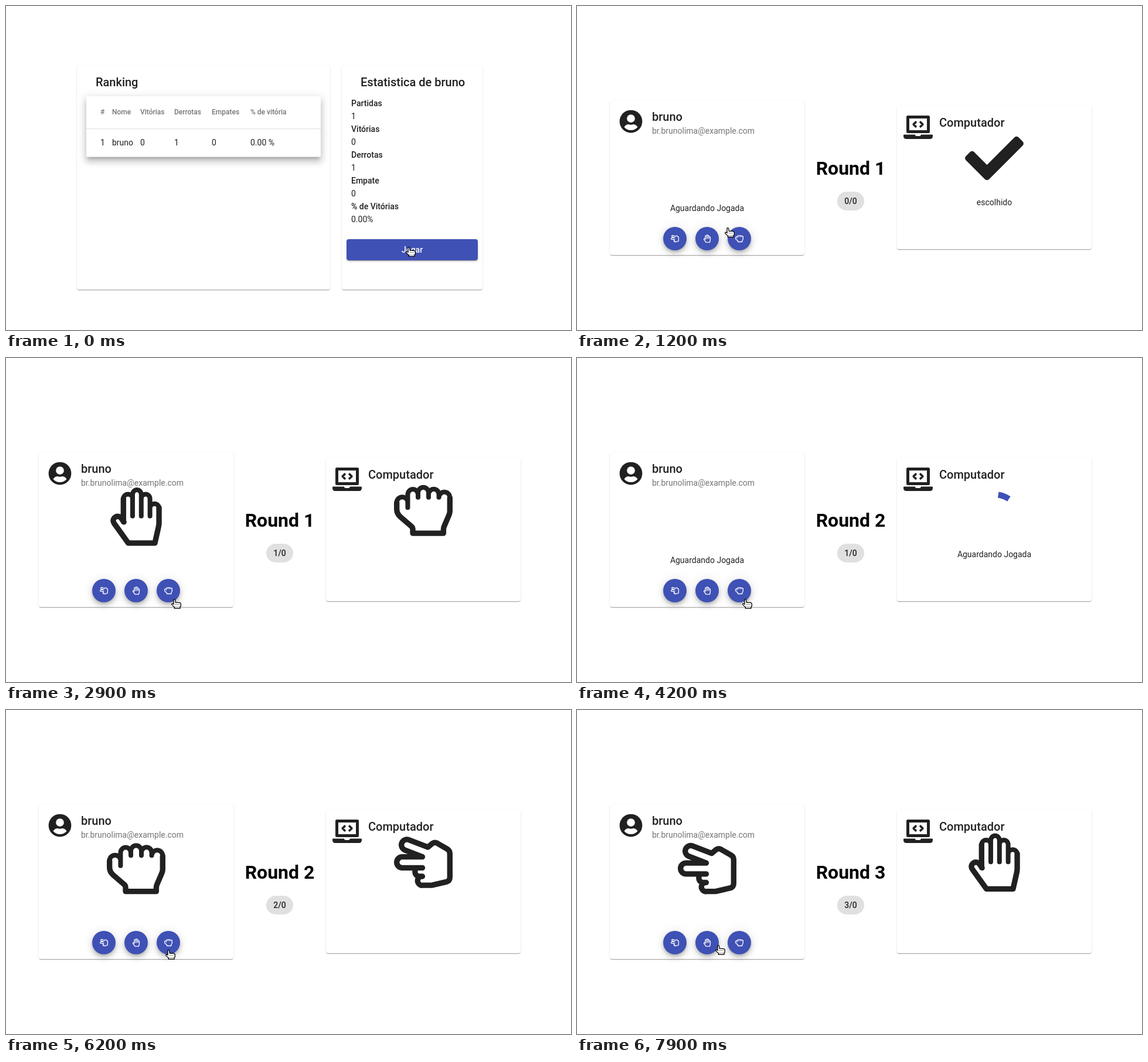
An HTML page that plays this animation: 964 by 553 pixels, repeating every 8000 ms.

```html
<!DOCTYPE html>
<html lang="pt">
<head>
<meta charset="utf-8">
<title>Jogo</title>
<style>
  html, body { margin: 0; width: 100%; height: 100%; overflow: hidden; background: #fff; }
  #stage { position: absolute; left: 0; top: 0; width: 964px; height: 553px; overflow: hidden; }
  #stage > svg, .box { position: absolute; }
  #stage > svg { left: 0; top: 0; }
  .box { left: var(--x); top: var(--y); width: var(--w); height: var(--h); background: #fff; }
  .card {
    border-radius: 4px;
    box-shadow: 0 2px 1px -1px rgba(0,0,0,.2), 0 1px 1px rgba(0,0,0,.14), 0 1px 3px rgba(0,0,0,.12);
  }
  .table, #play.pressed {
    box-shadow: 0 5px 5px -3px rgba(0,0,0,.2), 0 8px 10px 1px rgba(0,0,0,.14), 0 3px 14px 2px rgba(0,0,0,.12);
  }
  .table::before, .table::after {
    content: ""; position: absolute; left: 0; right: 0; height: 1px; background: rgba(0,0,0,.12);
  }
  .table::before { top: 55px; }
  .table::after { bottom: 0; }
  #play, .fab { background: #3f51b5; overflow: hidden; }
  #play {
    border-radius: 4px;
    box-shadow: 0 3px 1px -2px rgba(0,0,0,.2), 0 2px 2px rgba(0,0,0,.14), 0 1px 5px rgba(0,0,0,.12);
  }
  .fab {
    --y: 377px; --w: 40px; --h: 40px; border-radius: 50%;
    box-shadow: 0 3px 5px -1px rgba(0,0,0,.2), 0 6px 10px rgba(0,0,0,.14), 0 1px 18px rgba(0,0,0,.12);
  }
  .ripple {
    position: absolute; width: 2px; height: 2px; margin: -1px; border-radius: 50%; background: #fff;
  }
  text { font: 400 14px Roboto, sans-serif; fill: #212121; white-space: pre; }
  .title { font-size: 20px; font-weight: 500; }
  .bold { font-weight: 500; }
  .head { font-size: 12px; font-weight: 500; fill: #757575; }
  .soft { fill: #757575; }
  .round { font-size: 32px; font-weight: 700; fill: #000; }
  .mid { text-anchor: middle; }
  .icon { color: #212121; }
  .small { color: #fff; }
  symbol { overflow: visible; }
  .line { fill: none; stroke: currentColor; stroke-width: 48; stroke-linecap: round; stroke-linejoin: round; }
  .thin { stroke-width: 41; }
</style>
</head>
<body>
<div id="stage">
  <div data-on="0-800">
    <div class="box card" style="--x:121px;--y:101px;--w:432px;--h:383px"></div>
    <div class="box card" style="--x:573px;--y:101px;--w:240px;--h:383px"></div>
    <div class="box table" style="--x:137px;--y:154px;--w:400px;--h:104px"></div>
    <div class="box" id="play" style="--x:581px;--y:398px;--w:224px;--h:36px">
      <div class="ripple" style="left:105px;top:17px"></div>
    </div>
  </div>
  <div data-on="800-8000">
    <div class="box card" style="--x:56px;--y:161px;--w:332px;--h:264px"></div>
    <div class="box card" style="--x:546px;--y:171px;--w:332px;--h:244px"></div>
    <div class="box fab" style="--x:147px"><div class="ripple" style="left:14px;top:12px"></div></div>
    <div class="box fab" style="--x:202px"><div class="ripple" style="left:26px;top:12px"></div></div>
    <div class="box fab" style="--x:257px"><div class="ripple" style="left:29px;top:34px"></div></div>
  </div>

  <svg width="964" height="553" viewBox="0 0 964 553">
    <defs>
      <symbol id="paper" viewBox="-32 0 512 512">
        <path class="line" d="M424 179v131q0 20-5 40L388 488H155L32 316c-30-42 32-86 62-44l23 32M113 302V102"/>
        <path class="line thin" d="M113 102a40 40 0 0 1 80 0v150V65a38 42 0 0 1 76 0v187V102a38 41 0 0 1 76 0v150v-73a40 41 0 0 1 79 0"/>
      </symbol>
      <symbol id="rock" viewBox="0 0 512 512">
        <path class="line" d="M488 147v114q0 18-7 35l-43 100q-6 14-6 30v30H164v-34q0-15-11-25l-98-85q-31-26-31-67v-57"/>
        <path class="line thin" d="M24 187a48 48 0 0 1 96 0v45V119a45 47 0 0 1 90 0v23V103a46 48 0 0 1 92 0v39v-25a45 47 0 0 1 90 0v25a48 48 0 0 1 96 5"/>
      </symbol>
      <symbol id="scissors" viewBox="0 0 512 512">
        <path class="line" d="M248 208 96 149A48 48 0 0 1 130 59L296 123 334 92q20-16 42-4l90 52q22 12 22 41v205q0 32-32 41L335 455q-5 1-10 1H256a40 40 0 0 1-32-72
          M248 379H222a38 38 0 0 1-38-38v-37M248 304H72a48 48 0 0 1 0-96H248"/>
      </symbol>
      <symbol id="check" viewBox="0 0 512 512">
        <path fill="currentColor" stroke="currentColor" stroke-width="51" stroke-linejoin="round" d="M26 255 62 219 192 349 450 91 486 127 192 421z"/>
      </symbol>
      <symbol id="user" viewBox="0 0 496 512">
        <circle cx="248" cy="256" r="248" fill="currentColor"/>
        <circle cx="248" cy="192" r="88" fill="#fff"/>
        <path fill="#fff" d="M101 380q32-60 99-60 48 16 96 0 67 0 99 60-59 68-147 68T101 380z"/>
      </symbol>
      <symbol id="laptop" viewBox="0 0 640 512">
        <path fill="none" stroke="currentColor" stroke-width="64" stroke-linejoin="round" d="M96 32h448v320H96z"/>
        <path fill="currentColor" d="M0 432q0-16 16-16H255q2 32 33 32h61q30 0 33-32H624q16 0 16 16v16q0 64-64 64H64q-64 0-64-64z"/>
        <path class="line" d="M267 145 220 192 267 239M373 145 420 192 373 239"/>
      </symbol>
    </defs>

    <g data-on="0-800">
      <text class="title" x="153" y="137">Ranking</text>
      <g id="table"></g>
      <text class="title" x="605" y="137">Estatistica de bruno</text>
      <g id="stats"></g>
      <text class="bold mid" x="693" y="421" style="fill:#fff">Jogar</text>
    </g>

    <g data-on="800-8000">
      <use class="icon" href="#user" x="72" y="177" width="40" height="40"/>
      <text class="title" x="128" y="196">bruno</text>
      <text class="soft" x="128" y="218">br.brunolima@example.com</text>
      <use class="icon" href="#laptop" x="557" y="187" width="50" height="40"/>
      <text class="title" x="618" y="206">Computador</text>

      <text class="round mid" id="round" x="467" y="288"></text>
      <rect x="444" y="317" width="46" height="32" rx="16" fill="#e0e0e0"/>
      <text class="bold mid" id="score" x="467" y="338"></text>

      <g class="small">
        <use href="#scissors" x="160" y="390" width="14" height="14"/>
        <use href="#paper" x="215" y="390" width="14" height="14"/>
        <use href="#rock" x="270" y="390" width="14" height="14"/>
      </g>

      <text class="mid" x="222" y="350" data-on="800-2000 4200-4700 6900-7200">Aguardando Jogada</text>
      <g data-on="800-1000 4200-4400 6900-7100">
        <text class="mid" x="712" y="340">Aguardando Jogada</text>
        <circle id="spinner" cx="712" cy="278" r="45" pathLength="360" fill="none" stroke="#3f51b5" stroke-width="10"/>
      </g>
      <g data-on="1000-2000 4400-4700 7100-7200">
        <use class="icon" href="#check" x="662" y="210" width="100" height="100"/>
        <text class="mid" x="712" y="340">escolhido</text>
      </g>
      <g class="icon" id="moves"></g>
    </g>

    <g id="cursor" stroke="#000" stroke-linejoin="round">
      <g id="hand">
        <path fill="#fff" stroke-width="1.3" d="M4 9V2Q4 .7 5.2 .7T6.6 2L7.4 6.3H13.5Q16.3 6.5 16.3 9V12.5L15 14.2V16.4H5.4V14.4L1.2 10.4Q.2 8.8 1.6 8.2 2.7 8 4.6 9.8"/>
        <path stroke-width="1" stroke-dasharray="1 1.2" d="M7 9.5H14M6 14H15"/>
      </g>
      <path id="arrow" fill="#fff" d="M.5 .5V13.5L3.6 10.8 5.6 15.5 7.8 14.6 5.8 10H10z"/>
    </g>
  </svg>
</div>

<script>
const LOOP = 8000, STEP = 100;
const $ = id => document.getElementById(id);
const svg = (tag, attrs, text = '') => {
  const el = document.createElementNS('http://www.w3.org/2000/svg', tag);
  for (const key in attrs) el.setAttribute(key, attrs[key]);
  el.textContent = text;
  return el;
};

const columns = [[161, '#', '1'], [181, 'Nome', 'bruno'], [229, 'Vitórias', '0'],
  [287, 'Derrotas', '1'], [351, 'Empates', '0'], [417, '% de vitória', '0.00 %']];
for (const [x, head, value] of columns) {
  $('table').append(svg('text', { x, y: 185, class: 'head' }, head), svg('text', { x, y: 238 }, value));
}

['Partidas', '1', 'Vitórias', '0', 'Derrotas', '1', 'Empate', '0', '% de Vitórias', '0.00%'].forEach((line, i) =>
  $('stats').append(svg('text', { x: 589, y: 171 + 22 * i, class: i % 2 ? '' : 'bold' }, line)));

const rounds = [
  { start: 800, reveal: 2000, end: 4200, player: 'paper', computer: 'rock' },
  { start: 4200, reveal: 4700, end: 6900, player: 'rock', computer: 'scissors' },
  { start: 6900, reveal: 7200, end: LOOP, player: 'scissors', computer: 'paper' },
];
for (const r of rounds) {
  const move = (name, x, y) => svg('use', {
    href: '#' + name, x, y, width: 100, height: 100, 'data-on': `${r.reveal}-${r.end}`,
  });
  $('moves').append(move(r.player, 172, 220.5), move(r.computer, 662, 210));
}

const timed = [...document.querySelectorAll('[data-on]')].map(el => ({
  el, spans: el.dataset.on.split(' ').map(span => span.split('-').map(Number)),
}));

// Pointer stops: time, x, y
const stops = [
  [0, 682, 411], [800, 560, 390], [900, 400, 355], [1000, 309, 335],
  [1200, 252, 378], [1300, 240, 382], [1400, 230, 385], [1500, 224, 386],
  [2300, 250, 398], [2400, 272, 408], [2800, 277, 410], [2900, 282, 411], [4800, 282, 410],
  [6200, 272, 409], [6300, 258, 407], [6400, 244, 404], [6500, 233, 402],
  [6700, 205, 397], [6800, 178, 390], [6900, 156, 385],
  [7700, 180, 390], [7800, 212, 397], [7900, 236, 401],
];

const ripples = document.querySelectorAll('.ripple');
const presses = [
  { start: 400, fade: 800, end: 800, size: 120 },
  { start: 7200, fade: 7600, end: 7900, size: 44 },
  { start: 2000, fade: 2700, end: 2900, size: 44 },
  { start: 4700, fade: 5000, end: 5400, size: 44 },
];

function drawRipple(el, { start, fade, end, size }, t) {
  const grow = Math.min(1, (t - start + 60) / 450);
  const fading = t > fade ? (end - t) / (end - fade) : 1;
  el.style.opacity = t >= start && t < end ? 0.11 * fading : 0;
  el.style.transform = `scale(${size * (1 - (1 - grow) ** 2.3)})`;
}

function draw(t) {
  for (const { el, spans } of timed) {
    el.style.display = spans.some(([from, to]) => t >= from && t < to) ? '' : 'none';
  }
  const index = Math.max(0, rounds.findLastIndex(r => t >= r.start));
  $('round').textContent = `Round ${index + 1}`;
  $('score').textContent = `${rounds.filter(r => t >= r.reveal).length}/0`;

  const spun = t - rounds[index].start + 48;
  const arc = Math.min(288, 18 + 756 * (spun / 500) ** 2);
  $('spinner').setAttribute('stroke-dasharray', `${arc} 360`);
  $('spinner').setAttribute('transform', `rotate(${spun * 0.18 - 90} 712 278)`);

  $('play').classList.toggle('pressed', t >= 400);
  presses.forEach((press, i) => drawRipple(ripples[i], press, t));

  const [, x, y] = stops.findLast(stop => t >= stop[0]);
  const between = t >= 800 && t < 1200;
  $('cursor').setAttribute('transform', `translate(${x} ${y})`);
  $('hand').style.display = between ? 'none' : '';
  $('arrow').style.display = between ? '' : 'none';
}

const begin = performance.now();
function tick() {
  const t = (performance.now() - begin) % LOOP;
  draw(Math.floor(t / STEP) * STEP);
  requestAnimationFrame(tick);
}
tick();
</script>
</body>
</html>
```
